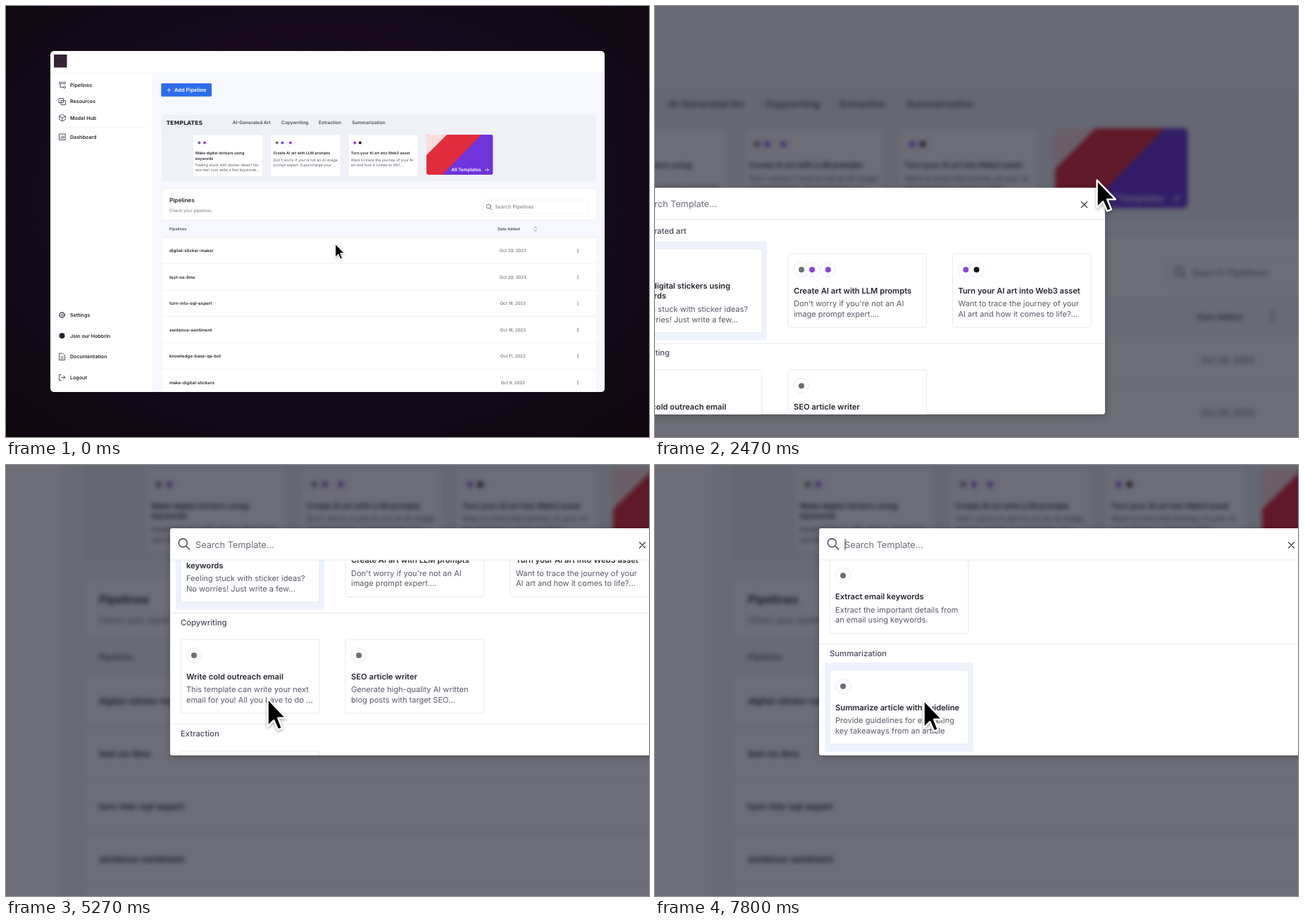
An HTML page that plays this animation: 913x613 px, repeating every 7.87 s.

```html
<!DOCTYPE html>
<html lang="en">
<head>
<meta charset="utf-8">
<title>Template picker</title>
<style>
html, body { margin: 0; width: 100%; height: 100%; overflow: hidden; background: #0d0811; }
svg { display: block; width: 913px; height: 613px; }
text { font-family: Inter, "Open Sans", sans-serif; text-rendering: geometricPrecision; white-space: pre; }
.line { fill: none; stroke: #3c4049; stroke-width: .9; stroke-linecap: round; stroke-linejoin: round; }
</style>
</head>
<body>
<svg id="stage" viewBox="0 0 913 613"></svg>
<script>
const LOOP = 7870;
const INK = '#23262e', GRAY = '#555a66', PALE = '#e8eaf0';

// ---------- drawing helpers ----------
const text = (x, y, s, size, weight = 400, fill = INK, extra = '') =>
  `<text x="${x}" y="${(y + size * .36).toFixed(2)}" font-size="${size}" font-weight="${weight}" fill="${fill}" ${extra}>${s}</text>`;
const rect = (x, y, w, h, fill, extra = '') =>
  `<rect x="${x}" y="${y}" width="${w}" height="${h}" fill="${fill}" ${extra}/>`;
const path = (d, extra = '') => `<path class="line" d="${d}" ${extra}/>`;
const rule = (x, y, w) => rect(x, y, w, .6, PALE);
const box = (x, y, w, h, r, width = .6) =>
  rect(x, y, w, h, '#fff', `rx="${r}" stroke="${PALE}" stroke-width="${width}"`);

const TINT = { g: '#6a6e76', s: '#8a43dd', m: '#15161a' };
const marks = (x, y, kinds, k) => [...kinds].map((c, i) => {
  const cx = x + [0, 7.6, 19][i] * k;
  return `<g class="mark"><circle cx="${cx}" cy="${y}" r="${5.3 * k}" fill="#fff" stroke="${PALE}" stroke-width="${.5 * k}"/>
    <circle cx="${cx}" cy="${y}" r="${2 * k}" fill="${TINT[c]}"/></g>`;
}).join('');
const lens = (x, y, k) =>
  path(`M${x + 1.6 * k} ${y + 1.6 * k}l${2.4 * k} ${2.4 * k}`, `style="stroke-width:${.7 * k}"`) +
  `<circle class="line" cx="${x - .6 * k}" cy="${y - .6 * k}" r="${3 * k}" style="stroke-width:${.7 * k}"/>`;

// ---------- page ----------
const TEMPLATES = [
  { marks: 'gs', title: ['Make digital stickers using', 'keywords'],
    wide: ['Feeling stuck with sticker ideas? No', 'worries! Just write a few keywords...'],
    body: ['Feeling stuck with sticker ideas?', 'No worries! Just write a few...'] },
  { marks: 'gss', title: ['Create AI art with LLM prompts'],
    wide: ["Don't worry if you're not an AI image", 'prompt expert. Supercharge your ...'],
    body: ["Don't worry if you're not an AI", 'image prompt expert....'] },
  { marks: 'sm', title: ['Turn your AI art into Web3 asset'],
    wide: ['Want to trace the journey of your AI', 'art and how it comes to life?...'],
    body: ['Want to trace the journey of your', 'AI art and how it comes to life?...'] }
];

function sidebar() {
  const items = [['Pipelines', 112.5], ['Resources', 135.8], ['Model Hub', 159], ['Dashboard', 186.3],
    ['Settings', 439.5], ['Join our Hobbrin', 469], ['Documentation', 498.7], ['Logout', 528.3]];
  const icons = [
    path('M77 109.5h6M77 109.5v6h5') + [[77, 109.5], [83, 109.5], [83, 115.5]].map(([x, y]) =>
      `<circle class="line" cx="${x}" cy="${y}" r="1.5" style="fill:#fff"/>`).join(''),
    path('M75.5 131.500h6v6h-6zM78.500 134.500h6v6h-6z'),
    path('M80 154.500l4.300 2.300v4.600l-4.300 2.300l-4.300-2.300v-4.600zM75.700 156.800l4.300 2.300l4.300-2.300M80 159.100v4.600'),
    path('M75.800 182h8.400v8.400h-8.400zM78 188.300v-2M80 188.300v-4M82 188.300v-3'),
    `<circle class="line" cx="79.500" cy="439.500" r="4" style="stroke-dasharray:1.900 1.240"/>
     <circle class="line" cx="79.500" cy="439.500" r="3.400"/><circle class="line" cx="79.500" cy="439.500" r="1.300"/>`,
    `<circle cx="79.500" cy="469" r="4" fill="#23262e"/>`,
    path('M76 494h4.500l3 3v6.500h-7.500zM78 499h3.500M78 501.300h3.500'),
    path('M78.500 524.300h-3v8h3M78.500 528.300h5.500M81.700 526l2.300 2.300l-2.300 2.300')
  ];
  return items.map(([s, y]) => text(91, y, s, 7.1, 600)).join('') + icons.join('') + rule(75, 172, 123);
}

function smallCard(t, i) {
  const x = 265.4 + 110.4 * i, n = t.title.length;
  return box(x, 183, 99, 59.3, 1.5) + marks(x + 9, 194.4, t.marks, 1) +
    t.title.map((s, j) => text(x + 3.6, 209.4 + 7.4 * j, s, 5.4, 600)).join('') +
    t.wide.map((s, j) => text(x + 3.6, 211.2 + 7.4 * (n + j), s, 5.27, 400, GRAY)).join('');
}

function table() {
  const rows = [['digital-sticker-maker', 29], ['test-os-llms', 29], ['turn-into-sql-expert', 18],
    ['sentence-sentiment', 16], ['knowledge-base-qa-bot', 11], ['make-digital-stickers', 9]];
  return rect(222, 329, 616, 220, '#fff') + rows.map(([name, day], i) => {
    const y = 348.2 + 37.45 * i;
    return rule(222, y - 19.2, 616) + text(232, y, name, 6.2, 600) +
      text(719.8, y, `Oct ${day}, 2023`, 6.15, 400, GRAY, 'text-anchor="middle"') +
      [-2, 0, 2].map(d => `<circle cx="812" cy="${y + d}" r=".7" fill="#444"/>`).join('');
  }).join('');
}

function page() {
  const tabs = [['AI-Generated Art', 321.8], ['Copywriting', 391.1], ['Extraction', 444], ['Summarization', 491.3]];
  return `<g clip-path="url(#win)">` + rect(63, 64, 787, 485, '#fff') +
    rect(207, 95, 643, 454, '#f6f8fd') + rule(63, 95, 787) +
    rect(68, 69, 18.5, 18.5, '#382437') + sidebar() +
    rect(220.3, 110, 71.7, 18.8, '#2e6ced', 'rx="1.5"') +
    path('M228.800 119.500h5M231.300 117v5', 'style="stroke:#fff;stroke-width:.8"') +
    text(239, 119.5, 'Add Pipeline', 7.5, 600, '#fff') +
    rect(221, 154.6, 617, 94.2, '#eff1f7') + rule(221, 176.7, 617) +
    text(227.7, 165.8, 'TEMPLATES', 7.9, 700, INK, 'style="font-family:\'DejaVu Sans\',sans-serif"') +
    tabs.map(([s, x]) => text(x, 166, s, 6.5, 600, '#4a4f5a')).join('') +
    TEMPLATES.map(smallCard).join('') +
    `<g clip-path="url(#promo)">` + rect(597, 183, 94.3, 57, '#e22c3c') +
    `<path fill="#fbdcdf" d="M597 183h29l-29 29z"/><path fill="#7034dc" d="M675 183h17v57h-72.500z"/></g>` +
    text(632.2, 233, 'All Templates', 6.5, 600, '#fff') +
    path('M680.200 233h5M683 231l2.200 2l-2.200 2', 'style="stroke:#fff;stroke-width:.7"') +
    rect(222, 260, 616, 44, '#fff') + rule(222, 259.5, 616) + rule(222, 304.5, 616) +
    text(232, 276, 'Pipelines', 8.1, 600) + text(232, 291, 'Check your pipelines', 6.05, 400, '#70757f') +
    box(677.2, 276, 150, 19, 2) + lens(685.8, 285.6, 1) +
    text(694.2, 285.7, 'Search Pipelines', 7, 400, '#70757f') +
    text(232, 317.2, 'Pipelines', 5.5, 600, '#4a4f5a') + text(698.2, 317.2, 'Date Added', 5.6, 600, '#4a4f5a') +
    path('M750 316l1.800-1.800l1.800 1.800M750 318.600l1.800 1.800l1.800-1.800', 'style="stroke-width:.6"') +
    table() + '</g>';
}

// ---------- modal (drawn at double size) ----------
const glow = (id, x, y, h) => rect(x - 7, y - 11, 211, h + 22, '#edf2fd', `id="${id}" rx="3"`);

function bigCard(x, y, t, id = '') {
  const n = t.title.length, h = 90.5 + 14.5 * n;
  return box(x, y, 197, h, 3, 1) + (id && rect(x, y, 197, h, '#f3f6fe', `id="${id}Box" rx="3" stroke="#6d87dc"`)) +
    `<g ${id && `id="${id}Body"`}>` + marks(x + 19, y + 22.7, t.marks, 2) +
    t.title.map((s, j) => text(x + 8, y + 52.5 + 14.5 * j, s, 11.2, 600)).join('') +
    t.body.map((s, j) => text(x + 8, y + 56.7 + 14.6 * (n + j), s, 11.05, 400, GRAY)).join('') + '</g>';
}

function modal() {
  const label = (y, s) => text(15, y, s, 11.3, 500, '#454a55');
  const card = (x, y, title, body, id) => bigCard(x, y, { marks: 'g', title: [title], body }, id);
  return rect(0, 0, 700, 323, '#fff', 'rx="3" style="filter:drop-shadow(0 2px 5px rgba(0,0,0,.25))"') +
    `<g clip-path="url(#list)"><g id="scroll">` + label(62, 'AI-generated art') +
    glow('glow0', 15, 87, 119) + glow('glow1', 249, 87, 119) + glow('glow2', 15, 576, 105) +
    TEMPLATES.map((t, i) => bigCard(15 + 234 * i, i ? 94 : 87, t)).join('') +
    rect(0, 221.5, 700, 1, PALE) + label(235.3, 'Copywriting') +
    card(15, 259.5, 'Write cold outreach email', ['This template can write your next', 'email for you! All you have to do ...']) +
    card(249, 259.5, 'SEO article writer', ['Generate high-quality AI written', 'blog posts with target SEO...']) +
    rect(0, 379.5, 700, 1, PALE) + label(393.5, 'Extraction') +
    card(15, 418.5, 'Extract email keywords', ['Extract the important details from', 'an email using keywords.'], 'extract') +
    `<g id="use">` + rect(63, 457.5, 101, 26, '#3a70ee', 'rx="13"') +
    text(113.5, 470.5, 'use template', 12.8, 500, '#fff', 'text-anchor="middle"') + '</g>' +
    rect(0, 538, 700, 1, PALE) + label(552, 'Summarization') +
    card(15, 576, 'Summarize article with guideline', ['Provide guidelines for extracting', 'key takeaways from an article']) +
    '</g></g>' + rect(0, 44.5, 700, 1, PALE) + lens(19.5, 22, 2) +
    text(36, 23, 'Search Template...', 12.7, 400, '#676b75') + rect(36.5, 15, 1, 16, '#333', 'id="caret"') +
    path('M666.500 20l8 8M674.500 20l-8 8', 'style="stroke-width:1.300"');
}

const stage = document.getElementById('stage');
stage.innerHTML = `<defs>
  <clipPath id="win"><rect x="63" y="64" width="787" height="485" rx="5"/></clipPath>
  <clipPath id="promo"><rect x="597" y="183" width="94.3" height="57" rx="3"/></clipPath>
  <clipPath id="list"><rect y="45" width="700" height="278"/></clipPath>
  <radialGradient id="night" cy=".45" r=".75">
    <stop offset="0" stop-color="#1d0e28"/><stop offset=".6" stop-color="#150a1a"/><stop offset="1" stop-color="#0d070c"/>
  </radialGradient>
  <filter id="smear" filterUnits="userSpaceOnUse" x="-900" y="-900" width="2700" height="2700" color-interpolation-filters="sRGB">
    <feGaussianBlur id="smearBlur" stdDeviation="0 0"/>
  </filter></defs>
  <g id="tilt"><g id="untilt"><g id="cam">
    <rect x="-20" y="-20" width="953" height="653" fill="url(#night)"/>
    <g id="page">${page()}</g>
    <g id="over">${rect(63, 64, 787, 485, '#0a0c1c', 'rx="5" opacity=".6"')}
      <g transform="translate(282.5 225.5) scale(.5)">${modal()}</g></g>
    <path id="cursor" d="M.5 .7V20.400L4.800 16L7.800 22.800L10.700 21.600L7.800 14.400H13.600Z" fill="#000" stroke="#fff"
      stroke-width="1.200" stroke-linejoin="round" style="filter:drop-shadow(0 1px 1px rgba(0,0,0,.3))"/>
  </g></g></g>`;

// ---------- motion ----------
const $ = id => document.getElementById(id);
const clamp = v => Math.min(1, Math.max(0, v));
const ramp = (t, a, b) => clamp((t - a) / (b - a));
const ease = (t, a, b) => { const p = ramp(t, a, b); return p * p * (3 - 2 * p); };

// Critically damped spring: position and speed per second
function spring(t, start) {
  const w = 6, x = Math.max(0, t - start) / 1000 * w, e = Math.exp(-x);
  return { p: 1 - (1 + x) * e, v: w * x * e };
}

const FOCUS = { x: 626, y: 192.3 };
const PAN = { x: 294, y: -168.7 };
const PAN_ANGLE = Math.atan2(PAN.y, PAN.x) * 180 / Math.PI;

const parts = [...document.querySelectorAll('#page text, #page .mark')].map(el => {
  const b = el.getBBox();
  return { el, far: Math.hypot(b.x + b.width / 2 - FOCUS.x, b.y + b.height / 2 - FOCUS.y) };
});
let softened = false;

function zoomBlur(rate, scale) {
  const on = rate > .1;
  if (!on && !softened) return;
  for (const { el, far } of parts) {
    const r = far * rate * .0038 / scale;
    el.style.filter = on && r > .1 ? `blur(${r.toFixed(2)}px)` : '';
  }
  softened = on;
}

function panBlur(rate) {
  const r = rate * Math.hypot(PAN.x, PAN.y) * .0047, on = r > .2;
  $('tilt').setAttribute('transform', on ? `rotate(${PAN_ANGLE})` : '');
  $('untilt').setAttribute('transform', on ? `rotate(${-PAN_ANGLE})` : '');
  $('tilt').setAttribute('filter', on ? 'url(#smear)' : 'none');
  $('smearBlur').setAttribute('stdDeviation', `${r.toFixed(2)} 0.4`);
}

function cursorAt(t) {
  const a = spring(t, 500).p, b = spring(t, 3035).p, c = ramp(t, 7600, 7800) ** 2;
  return [467 + 159.3 * a - 275 * b + 5 * c, 337.3 - 118 * a + 126.7 * b ** 1.5 + c];
}

function draw(t) {
  const zoom = spring(t, 1206), pan = spring(t, 3171), scale = 1 + zoom.p;
  const tx = -FOCUS.x * zoom.p + PAN.x * pan.p, ty = -FOCUS.y * zoom.p + PAN.y * pan.p;
  $('cam').setAttribute('transform', `matrix(${scale} 0 0 ${scale} ${tx} ${ty})`);
  zoomBlur(zoom.v, scale);
  panBlur(pan.v);

  const open = ease(t, 2000, 2200);
  $('over').style.opacity = open;
  $('over').style.display = open ? '' : 'none';
  $('page').style.filter = open ? `blur(${1.5 * open}px)` : '';

  const scroll = 101.5 * ease(t, 4400, 5100) + 117 * ease(t, 5400, 6080) + 155.5 * ease(t, 6500, 7350);
  $('scroll').setAttribute('transform', `translate(0 ${-scroll})`);

  const chosen = t > 7650 ? 2 : t > 3150 && t < 3650 ? 1 : 0;
  for (let i = 0; i < 3; i++) $('glow' + i).style.opacity = +(i === chosen);

  const hover = ramp(t, 6100, 6300) * (1 - ramp(t, 6500, 6700));
  $('use').style.opacity = hover;
  $('extractBox').style.opacity = hover;
  $('extractBody').style.opacity = 1 - .8 * hover;
  $('caret').style.opacity = +(t % 1000 >= 500);
  $('cursor').setAttribute('transform', `translate(${cursorAt(t)})`);
}

const start = performance.now();
function tick() {
  draw((performance.now() - start) % LOOP);
  requestAnimationFrame(tick);
}
draw(0);
requestAnimationFrame(tick);
</script>
</body>
</html>
```
